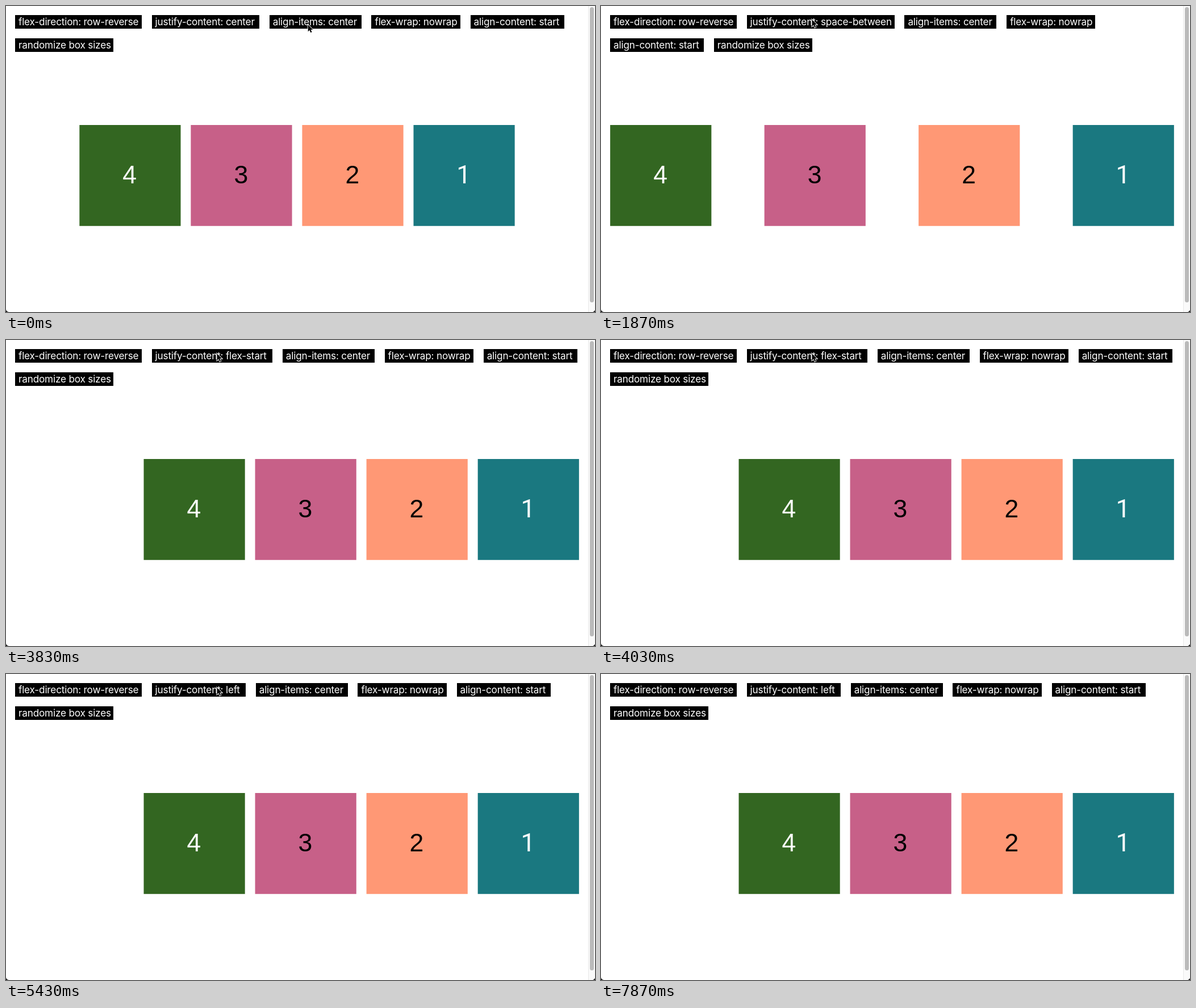
An HTML page that plays this animation: 1037x540 px, repeating every 8.21 s.

```html
<!DOCTYPE html>
<html lang="en">
<head>
<meta charset="utf-8">
<title>Flexbox playground</title>
<style>
html { margin: 0; height: 100%; background: #000; overflow: hidden; }
body {
  position: relative; margin: 0; height: 100%; overflow: hidden;
  background: #fff; border-radius: 0 0 5px 5px;
}
#bar {
  position: absolute; left: 16px; top: 16px; width: 994px;
  display: flex; flex-wrap: wrap; gap: 17.8px;
}
#bar div {
  box-sizing: border-box; height: 23.7px; padding-left: 6px;
  background: #000; color: #fff; white-space: nowrap;
  font: 17.2px/23.7px Inter, sans-serif; letter-spacing: -.2px;
}
svg { position: absolute; left: 0; top: 0; overflow: visible; }
#boxes text { font: 44.5px "Liberation Sans", Arial, sans-serif; text-anchor: middle; }
#boxes .plain { font-family: Roboto, sans-serif; }
#track {
  position: absolute; right: 0; top: 0; bottom: 0; width: 11px;
  background: #fafafa; border-left: 1px solid #e8e8e8;
}
#thumb {
  position: absolute; left: 2px; top: 2px; width: 7px; height: 521px;
  border-radius: 4px; background: #bababa;
}
</style>
</head>
<body>
<div id="bar"></div>
<svg id="boxes" width="1037" height="540"></svg>
<div id="track"><div id="thumb"></div></div>
<svg id="cursor" width="12" height="18">
  <path d="M0 0V12.2L2.8 9.6L4.7 14L6.8 13.1L4.9 8.8H8.7Z" stroke="#fff" stroke-width="1.8" paint-order="stroke"/>
</svg>
<script>
const LOOP = 8210;
const LEFT = 16.15, WIDTH = 992.7, SIZE = 178.2, GAP = 17.85;
const FREE = WIDTH - 4 * SIZE - 3 * GAP;
const $ = id => document.getElementById(id);

// start time, justify-content value, button width,
// share of the free space before the boxes and between them
const states = [
  [0, 'center', 189.3, 1 / 2, 0],
  [1600, 'space-between', 260, 0, 1 / 3],
  [2830, 'space-around', 251.2, 1 / 8, 1 / 4],
  [3300, 'space-evenly', 246, 1 / 5, 1 / 5],
  [3830, 'flex-start', 212.4, 1, 0],
  [4830, 'flex-end', 206, 0, 0],
  [5430, 'left', 165.3, 1, 0]
];

const buttons = [
  ['flex-direction: row-reverse', 222.8],
  ['justify-content: center', 189.3],
  ['align-items: center', 162],
  ['flex-wrap: nowrap', 156.3],
  ['align-content: start', 165],
  ['randomize box sizes', 173.4]
].map(([text, width]) => {
  const b = $('bar').appendChild(document.createElement('div'));
  b.textContent = text;
  b.style.width = width + 'px';
  return b;
});

$('boxes').innerHTML = [
  [4, '#336621', '#fff'],
  [3, '#c76088', '#000'],
  [2, '#ff9875', '#000'],
  [1, '#1a7880', '#fff']
].map(([n, back, ink]) => `<g>
  <rect width="${SIZE}" height="${SIZE}" fill="${back}"/>
  <text x="88.4" y="103" fill="${ink}"${n === 1 ? ' class="plain"' : ''}>${n}</text>
</g>`).join('');
const boxes = [...$('boxes').children];

const progress = (t, a, b) => Math.min(1, Math.max(0, (t - a) / (b - a)));
const ease = p => p * p * (3 - 2 * p);
let shown;

function show([, value, width, before, between]) {
  buttons[1].textContent = 'justify-content: ' + value;
  buttons[1].style.width = width + 'px';
  boxes.forEach((box, i) => {
    const x = LEFT + before * FREE + i * (SIZE + GAP + between * FREE);
    box.setAttribute('transform', `translate(${x} 210)`);
  });
}

function draw(now) {
  const t = now % LOOP;
  const state = states.findLast(s => t >= s[0]);
  if (state !== shown) show(shown = state);
  const p = ease(progress(t, 830, 1430));
  $('cursor').style.transform = `translate(${531.7 - 160.2 * p}px, ${33 - 9 * p}px)`;
  $('cursor').style.opacity = 1 - progress(t, 6500, 7300);
  requestAnimationFrame(draw);
}
draw(0);
</script>
</body>
</html>
```
